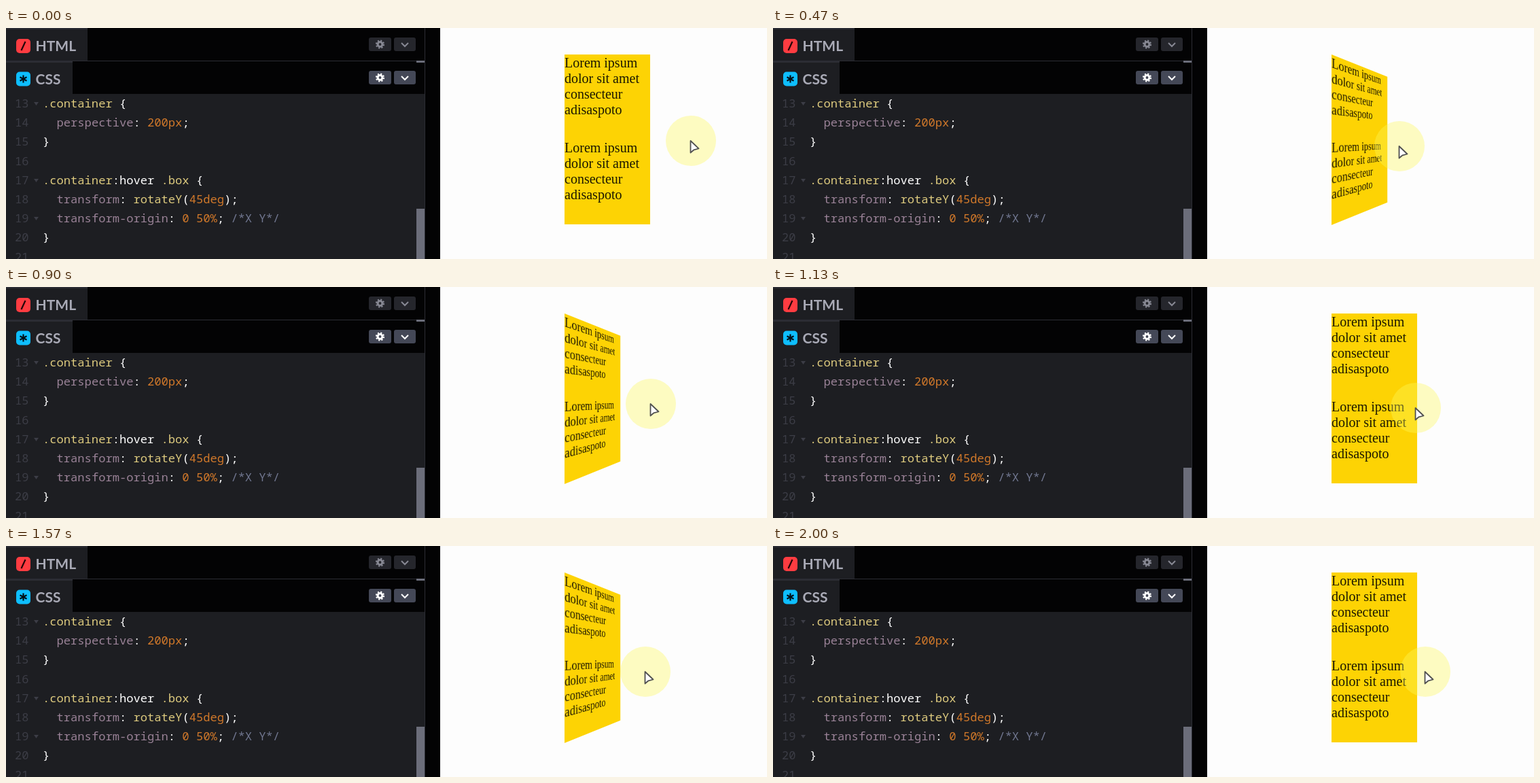
An HTML page for the animation above (2.06 s loop, 1120 px wide and 340 px high).

```html
<!DOCTYPE html>
<html lang="en">
<head>
<meta charset="utf-8">
<title>Hover rotation</title>
<style>
  html, body { margin: 0; width: 100%; height: 100%; overflow: hidden; background: #fdfdfd; }
  #stage { position: relative; width: 1120px; height: 340px; overflow: hidden; background: #fdfdfd; }
  svg, pre, .container { position: absolute; left: 0; top: 0; margin: 0; }
  pre { top: 97px; font: 17.13px/28.2px "Noto Sans Mono", monospace; color: #fff; }
  .numbers { left: 13px; color: #3c3d46; }
  .code { left: 54px; }
  .tab { font: bold 21px Lato, sans-serif; fill: #a9aab6; }
  .s { color: #ddca7e; }
  .p { color: #9a8297; }
  .n { color: #d0782a; }
  .c { color: #717790; }
  .container { left: 822px; top: 38.6px; width: 125.6px; height: 250.6px; perspective: 250px; }
  .panel { height: 100%; background: #fdd304; transform-origin: 0 50%; }
  .box { height: 124px; padding-top: 1.2px; font: 20px/23px "Liberation Serif", serif; color: #1c1800; }
</style>
</head>
<body>
<div id="stage">
  <svg width="1120" height="340">
    <defs>
      <g id="buttons">
        <rect x="534" width="33" height="20" rx="3"/>
        <rect x="571" width="32" height="20" rx="3"/>
        <g fill="none" stroke="currentColor">
          <circle cx="550.5" cy="10" r="3.4" stroke-width="3"/>
          <circle cx="550.5" cy="10" r="5.6" stroke-width="2" stroke-dasharray="2.2"/>
          <path d="M582 8l5 5 5-5" stroke-width="2"/>
        </g>
      </g>
    </defs>
    <path fill="#030304" d="M0 0H639V340H0z"/>
    <path fill="#1d1e22" d="M0 0H120V48H0zM0 49H98V97H0zM0 97H616V340H0z"/>
    <path fill="#2c2d34" d="M0 0H120V2H0zM0 48H616V49H0zM0 49H98V51H0zM616 0h1V340h-1z"/>
    <path fill="#6b6d7a" d="M604 48h12v3h-12zM604 266h12v74h-12z"/>
    <rect x="15" y="16" width="21" height="21" rx="5" fill="#ff3c41"/>
    <path d="M22.5 33L28.5 20" stroke="#240608" stroke-width="2.2"/>
    <rect x="15" y="64.5" width="21" height="21" rx="5" fill="#0ebeff"/>
    <path d="M25.5 69.5v11M20.5 72.3l10 5.4M20.5 77.7l10-5.4" stroke="#001018" stroke-width="2.2"/>
    <text class="tab" x="43.5" y="34">HTML</text>
    <text class="tab" x="43.5" y="83">CSS</text>
    <use href="#buttons" y="14" fill="#25262c" color="#878893"/>
    <use href="#buttons" y="63" fill="#444857" color="#fff"/>
    <path fill="#3c3d46" d="M41 109h7l-3.5 5zM41 222h7l-3.5 5zM41 278h7l-3.5 5z"/>
  </svg>
  <pre class="numbers">13
14
15
16
17
18
19
20
21</pre>
  <pre class="code"><span class="s">.container</span> {
  <span class="p">perspective</span>: <span class="n">200px</span>;
}

<span class="s">.container</span>:hover <span class="s">.box</span> {
  <span class="p">transform</span>: <span class="s">rotateY</span>(<span class="n">45deg</span>);
  <span class="p">transform-origin</span>: <span class="n">0 50%</span>; <span class="c">/*X Y*/</span>
}</pre>
  <div class="container">
    <div class="panel" id="panel">
      <div class="box">Lorem ipsum<br>dolor sit amet<br>consecteur<br>adisaspoto</div>
      <div class="box">Lorem ipsum<br>dolor sit amet<br>consecteur<br>adisaspoto</div>
    </div>
  </div>
  <svg width="1120" height="340">
    <g id="pointer">
      <circle r="37" fill="#fcf65a" fill-opacity=".37"/>
      <path id="arrow" d="M-.5 0V17.5L4.5 13.3L11.5 11.5Z" fill="#fff" stroke="#505050" stroke-width="1.8" stroke-linejoin="round"/>
      <path id="beam" d="M-4-7.5h2.5l1.5 1 1.5-1h2.5M0-6.5V7.5M-4 8.5h2.5l1.5-1 1.5 1h2.5" fill="none" stroke="#0c0a00" stroke-width="2.2"/>
    </g>
  </svg>
</div>
<script>
  const LOOP = 2060, STEP = 1000 / 30;
  // Pointer path: step, x, y
  const path = [
    [0, 1008, 166], [7, 1020, 166], [11, 1020, 166], [13, 940, 172], [14, 922, 174],
    [18, 866, 182], [22, 866, 182], [27, 949, 172], [30, 972, 173], [34, 946, 178],
    [38, 865, 190], [41, 865, 190], [47, 941, 185], [50, 960, 184], [53, 955, 181],
    [57, 955, 181], [60, 960, 185], [62, 960, 185]
  ];
  const el = id => document.getElementById(id);
  const panel = el('panel'), pointer = el('pointer'), arrow = el('arrow'), beam = el('beam');

  function pointerAt(step) {
    const s = Math.max(0, step);
    const i = path.findIndex(key => key[0] > s);
    const [s0, x0, y0] = path[i - 1], [s1, x1, y1] = path[i];
    const f = (s - s0) / (s1 - s0);
    return [x0 + (x1 - x0) * f, y0 + (y1 - y0) * f];
  }

  function draw(time) {
    const step = Math.floor((time % LOOP + 3.4) / STEP);
    const [x, y] = pointerAt(step);
    // The hover state follows one step behind the pointer
    const hover = pointerAt(step - 1)[0] < 947;
    const overText = hover && x < 896;
    panel.style.transform = hover ? 'rotateY(45deg)' : 'none';
    pointer.setAttribute('transform', `translate(${x} ${y})`);
    arrow.style.display = overText ? 'none' : '';
    beam.style.display = overText ? '' : 'none';
  }

  const start = performance.now();
  function tick() {
    draw(performance.now() - start);
    requestAnimationFrame(tick);
  }
  tick();
</script>
</body>
</html>
```
